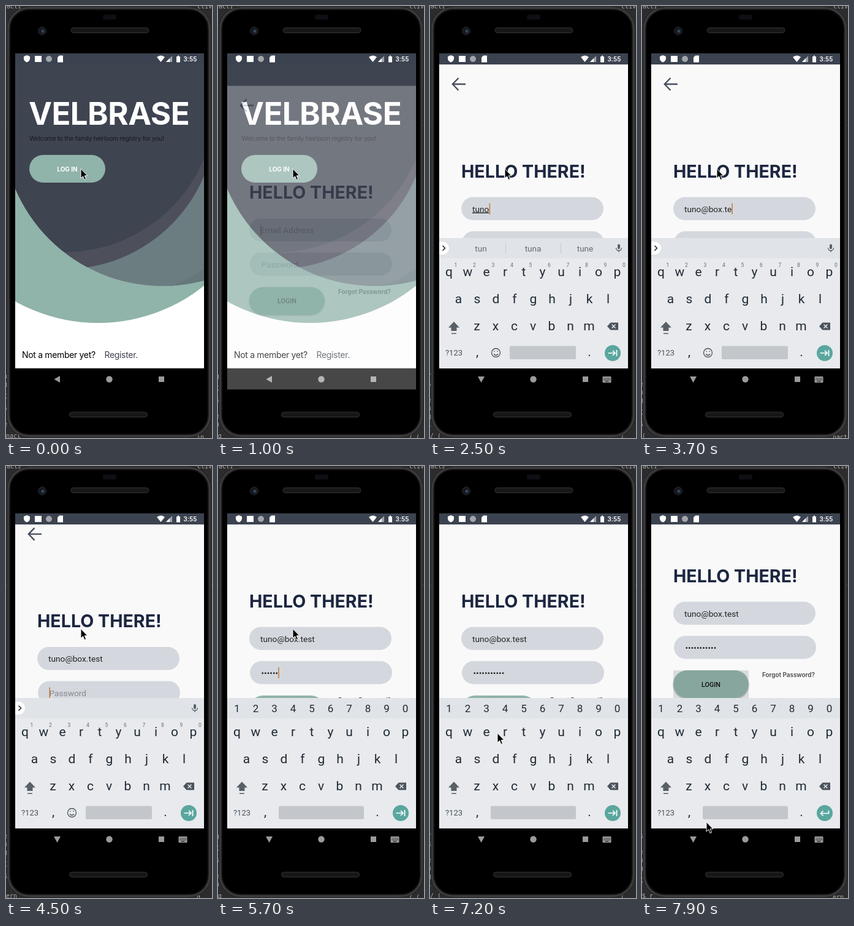
Animation, 336 px wide and 702 px high, one loop 8 s. Source, as an HTML page:

```html
<!DOCTYPE html>
<html lang="en">
<head>
<meta charset="utf-8">
<title>Sign-in demo</title>
<style>
  html, body { margin: 0; width: 100%; height: 100%; overflow: hidden; background: #2c2c2e; }
  svg { display: block; width: 336px; height: 702px; }
  text { font-family: Roboto, sans-serif; white-space: pre; }
  .inter { font-family: Inter, sans-serif; }
  .mono text { font: 10px "DejaVu Sans Mono", monospace; fill: #aaa; }
  .mid { text-anchor: middle; }
  .field { font-size: 13.7px; }
  .line { fill: none; stroke-width: 2; }
</style>
</head>
<body>
<svg viewBox="0 0 336 702">
  <defs>
    <clipPath id="content"><rect x="15" y="95" width="308" height="493.700"/></clipPath>
    <clipPath id="welcomeArea"><rect x="15" y="77" width="308" height="511.700"/></clipPath>
    <clipPath id="disc"><circle cx="255" cy="194" r="261"/></clipPath>
    <clipPath id="body"><rect x="1.500" y="1" width="333" height="700" rx="35"/></clipPath>
    <filter id="soft"><feGaussianBlur stdDeviation="1.500"/></filter>
    <filter id="shadow" x="-10%" y="-20%" width="120%" height="150%">
      <feDropShadow dx="0" dy="1.2" stdDeviation="1" flood-opacity=".35"/>
    </filter>
  </defs>

  <!-- Desktop and phone body -->
  <rect width="336" height="702" fill="#2c2c2e"/>
  <path d="M0 193.500H336" stroke="#555"/>
  <g class="mono">
    <text x="1" y="4">acti</text>
    <text x="312" y="4">ctiv</text>
    <text id="logLeft" x="0" y="702"></text>
    <text id="logRight" x="305" y="704"></text>
    <g id="logEdge"></g>
  </g>
  <g clip-path="url(#body)">
    <rect width="336" height="702"/>
    <rect x="3.500" y="3" width="329" height="696" rx="34" fill="none" stroke="#4c4c4e" stroke-width="4" filter="url(#soft)"/>
  </g>
  <rect x="158" y="14" width="22" height="8" rx="3" fill="#0e0e14"/>
  <circle cx="59" cy="40.500" r="6.500" fill="#15181d" stroke="#25272b"/>
  <circle cx="60" cy="41" r="2.500" fill="#33485f"/>
  <g fill="#171717" stroke="#343434">
    <rect x="106" y="35.500" width="127" height="8" rx="4"/>
    <rect x="103.500" y="660" width="127" height="8" rx="4"/>
  </g>

  <!-- Welcome screen -->
  <g id="welcome" clip-path="url(#welcomeArea)">
    <rect x="15" y="77" width="308" height="512" fill="#fff"/>
    <circle cx="150" cy="237" r="278" fill="#90b3aa"/>
    <g clip-path="url(#disc)">
      <rect x="-10" y="-70" width="350" height="530" fill="#6c7d81"/>
      <path d="M262 456Q300 446 323 426V460Z" fill="#66777c"/>
      <circle cx="95" cy="180" r="247.500" fill="#4d4f5b"/>
      <circle cx="95" cy="153" r="247" fill="#3e4450"/>
    </g>
    <path d="M15 77H323V194H15Z" fill="#3e4450"/>
    <text class="inter" x="37" y="193" font-size="51" font-weight="700" letter-spacing="-.6" fill="#fff">VELBRASE</text>
    <text class="inter" x="38" y="219" font-size="10.500" letter-spacing="-.39" fill="#181b20">Welcome to the family heirloom registry for you!</text>
    <rect x="38" y="242" width="124" height="45" rx="22.500" fill="#90b3aa"/>
    <text class="inter mid" x="100" y="269" font-size="10" font-weight="700" fill="#fff">LOG IN</text>
    <text class="inter" x="26" y="571.500" font-size="14" letter-spacing="-.33">Not a member yet?</text>
    <text class="inter" x="160.500" y="571.500" font-size="14" letter-spacing="-.33" fill="#3e4450">Register.</text>
  </g>

  <!-- Navigation bar -->
  <g fill="#9b9b9b">
    <path id="navBack"/>
    <circle cx="168.500" cy="606.500" r="5.200"/>
    <rect x="249" y="602" width="9" height="9"/>
    <g id="navKeyboard">
      <rect x="281.500" y="602" width="14" height="10" rx="1"/>
      <path d="M283.500 605H294M283.500 607.500H294" stroke="#000" stroke-dasharray="1.300 1"/>
      <path d="M285.500 610H291.500" stroke="#000"/>
    </g>
  </g>

  <!-- Login screen -->
  <g id="login"><g clip-path="url(#content)">
    <rect x="15" y="94" width="308" height="495" fill="#f9f9f9"/>
    <g id="scroll">
      <path class="line" d="M58 127H37.500M46.500 117L36.800 127L46.500 137" stroke="#474d5c" style="stroke-width:2.300"/>
      <text class="inter" x="51" y="278.500" font-size="28.600" font-weight="700" fill="#1c2640">HELLO THERE!</text>
      <rect x="51" y="310.500" width="232" height="37.500" rx="18.700" fill="#d4d8de"/>
      <rect x="52" y="366" width="232" height="37.500" rx="18.700" fill="#d4d8de"/>
      <text class="field" id="email" x="69" y="334.500"></text>
      <text class="field" id="password" x="70.500" y="390"></text>
      <rect id="caret" width="1.500" height="18" fill="#c47a34"/>
      <rect id="focus" x="51" y="422" width="123" height="45" fill="#dcdcdc"/>
      <rect id="button" x="51" y="422" width="123" height="45" rx="22.500" filter="url(#shadow)"/>
      <text class="mid" x="112.500" y="448.500" font-size="10.800" font-weight="500" fill="#111">LOGIN</text>
      <text class="inter" x="196" y="433" font-size="10" font-weight="600" letter-spacing="-.05" fill="#4a4a4a">Forgot Password?</text>
    </g>
  </g></g>

  <!-- Keyboard -->
  <g clip-path="url(#content)"><g id="keyboard">
    <rect x="15" y="377" width="308" height="212" fill="#e8eaed"/>
    <rect x="15" y="377" width="308" height="33" fill="#e0e3e7"/>
    <g id="keys" class="mid" font-size="21" fill="#202a35"></g>
    <g id="textMode">
      <path d="M15 383H20.500A10.500 10.500 0 0 1 20.500 404H15Z" fill="#fff"/>
      <path class="line" d="M20.500 389.500L24.500 393.500L20.500 397.500" stroke="#222" style="stroke-width:1.500"/>
      <rect x="306" y="387" width="4" height="8" rx="2" fill="#596067"/>
      <path d="M303.500 393A4.500 4.500 0 0 0 312.500 393M308 397.500V400" fill="none" stroke="#596067" stroke-width="1.300"/>
      <g id="superscripts" class="mid" font-size="8.500" fill="#666c73"></g>
      <g id="suggestions">
        <path d="M123.500 385V402M213.500 385V402" stroke="#c6cace"/>
        <g class="mid" font-size="13.500" fill="#666b70">
          <text x="83" y="398.500">tun</text><text x="168" y="398.500">tuna</text><text x="253" y="398.500">tune</text>
        </g>
      </g>
      <g fill="none" stroke="#4b535c" stroke-width="1.300">
        <circle cx="107.500" cy="563.500" r="7"/>
        <path d="M104 565.500Q107.500 569.500 111 565.500M105 560.500V562M110 560.500V562"/>
      </g>
    </g>
    <g id="digits" class="mid" font-size="17" fill="#202a35"></g>
    <path d="M39 513L48 522.500H43.500V528H34.500V522.500H30ZM35 531.500H43V533H35Z" fill="#596067"/>
    <path d="M289 520.500L294.500 514.500H307V526.500H294.500Z" fill="#4b535c"/>
    <path d="M296.500 517.500L302.500 523.500M302.500 517.500L296.500 523.500" stroke="#e8eaed" stroke-width="1.500"/>
    <text class="mid" x="39" y="568" font-size="13" fill="#4b535c">?123</text>
    <rect id="space" y="552.500" height="21.500" rx="2" fill="#c3c6ca"/>
    <circle cx="298" cy="564" r="13" fill="#5aa69f"/>
    <path id="action" class="line" stroke="#fff" style="stroke-width:1.700"/>
  </g></g>

  <!-- Status bar -->
  <rect x="15" y="77" width="308" height="18" fill="#3c4350"/>
  <g fill="#fff">
    <path d="M34 80L39 82V85.500Q38.500 90 34 91.500Q29.500 90 29 85.500V82Z"/>
    <rect x="47" y="81" width="11" height="10"/>
    <circle cx="70" cy="86" r="5" fill="#a2a5ab"/>
    <path d="M87 80.500H93V91.500H84V83.500Z"/>
    <path d="M246 83Q252.500 78 259 83L252.500 91Z"/>
    <path d="M271 81V91H261Z" fill="#a0a4ab"/>
    <path d="M267 85V91H261Z"/>
    <path d="M278 82H280V80.500H282V82H284V91.500H278Z"/>
    <text x="289.500" y="90" font-size="11" font-weight="500">3:55</text>
  </g>

  <path id="pointer" d="M0 0V15.500L3.600 12.200L6 18L8.600 16.900L6.200 11.300H11Z" stroke="#fff" stroke-width="1"/>
</svg>

<script>
const el = id => document.getElementById(id);
const clamp = x => Math.min(1, Math.max(0, x));
const progress = (t, start, length) => clamp((t - start) / length);
const smooth = x => x * x * (3 - 2 * x);
const easeOut = (x, power) => 1 - (1 - x) ** power;
const show = (id, on) => { el(id).style.display = on ? '' : 'none'; };
const set = (id, attrs) => { for (const k in attrs) el(id).setAttribute(k, attrs[k]); };

const row = (chars, x, y) => [...chars]
  .map((c, i) => `<text x="${x + 30.5 * i}" y="${y}">${c}</text>`).join('');

el('keys').innerHTML = row('qwertyuiop', 31, 439) + row('asdfghjkl', 46.5, 483) +
  row('zxcvbnm', 76.5, 527) + row(',', 77, 569) + row('.', 260, 569);
el('superscripts').innerHTML = row('1234567890', 42, 424);
el('digits').innerHTML = row('1234567890', 31, 400);

const LOOP = 8000, OPEN = 985, KEYBOARD = 1900, TAB = 4404, SECURE = 4700, SUBMIT = 7600;
const EMAIL = 'tuno@box.test';
const emailKeys = [...EMAIL].map((_, i) => i < 4 ? 2050 + i * 133 : 2750 + (i - 4) * 140);
const passwordKeys = Array.from({ length: 11 }, (_, i) => 5000 + i * 140);
const logs = ['nact', 'g', 'in', '/ (', '$ r', '(_', 'ern'];
const pointerPath = [[6900, 122, 264.5], [7500, 98, 602], [7700, 98, 602], [7900, 105, 578.5]];

function pointerAt(t) {
  let [, x, y] = pointerPath[0];
  for (let i = 1; i < pointerPath.length; i++) {
    const [start] = pointerPath[i - 1], [end, toX, toY] = pointerPath[i];
    const p = smooth(progress(t, start, end - start));
    x += (toX - x) * p;
    y += (toY - y) * p;
  }
  return `translate(${x} ${y})`;
}

function fillField(id, value, hint) {
  el(id).textContent = value || hint;
  el(id).setAttribute('fill', value ? '#222' : '#85888c');
  return value ? el(id).getComputedTextLength() : 0;
}

function draw(t) {
  // The login window fades in while rising
  const alpha = easeOut(progress(t, OPEN, 200), 4);
  const rise = 43.8 * (1 - easeOut(progress(t, OPEN, 350), 5));
  set('login', { opacity: alpha, transform: `translate(0 ${rise})` });
  show('welcome', alpha < 1);

  const scroll = 49 * smooth(progress(t, TAB, 250)) + 41 * smooth(progress(t, SUBMIT, 250));
  set('scroll', { transform: `translate(0 ${-scroll})` });

  // Typing and caret
  const typedEmail = emailKeys.filter(k => k <= t);
  const typedPassword = passwordKeys.filter(k => k <= t);
  const emailWidth = fillField('email', EMAIL.slice(0, typedEmail.length), 'Email Address');
  const passwordWidth = fillField('password', '•'.repeat(typedPassword.length), 'Password');
  const composing = typedEmail.length > 0 && typedEmail.length < 5;
  el('email').style.textDecoration = composing ? 'underline' : '';
  const onPassword = t >= TAB;
  const lastKey = onPassword ? Math.max(TAB, ...typedPassword) : Math.max(OPEN, ...typedEmail);
  show('caret', t < SUBMIT && (t - lastKey) % 500 < 250);
  set('caret', onPassword ? { x: 70.5 + passwordWidth, y: 376 } : { x: 69.2 + emailWidth, y: 320.5 });

  const submitting = t >= SUBMIT;
  show('focus', submitting);
  set('button', { fill: submitting ? '#87a79e' : '#90b3aa' });

  // Keyboard
  const open = t >= KEYBOARD, secure = t >= SECURE;
  show('keyboard', open);
  set('keyboard', { transform: `translate(0 ${211 * (1 - easeOut(progress(t, KEYBOARD, 150), 3))})` });
  show('textMode', !secure);
  show('digits', secure);
  show('suggestions', composing);
  set('space', secure ? { x: 99, width: 139 } : { x: 130, width: 108 });
  set('action', { d: submitting
    ? 'M304.500 560V564.500H292M295.500 560.500L291.500 564.500L295.500 568.500'
    : 'M290.500 564H302M298 560L302 564L298 568M304.500 559V569' });
  show('navKeyboard', open);
  set('navBack', { d: open ? 'M78 602H89L83.500 612Z' : 'M88 601V612L78.500 606.500Z' });

  // Log output behind the phone
  const step = Math.floor(t / 700);
  const log = i => logs[(step + i) % logs.length];
  el('logLeft').textContent = log(0);
  el('logRight').textContent = ' ' + log(2);
  el('logEdge').innerHTML = logs.map((_, i) => `<text x="-4" y="${605 + i * 13}">${log(i)[0]}</text>`).join('');

  set('pointer', { transform: pointerAt(t) });
}

function frame() {
  draw(performance.now() % LOOP);
  requestAnimationFrame(frame);
}
frame();
</script>
</body>
</html>
```
